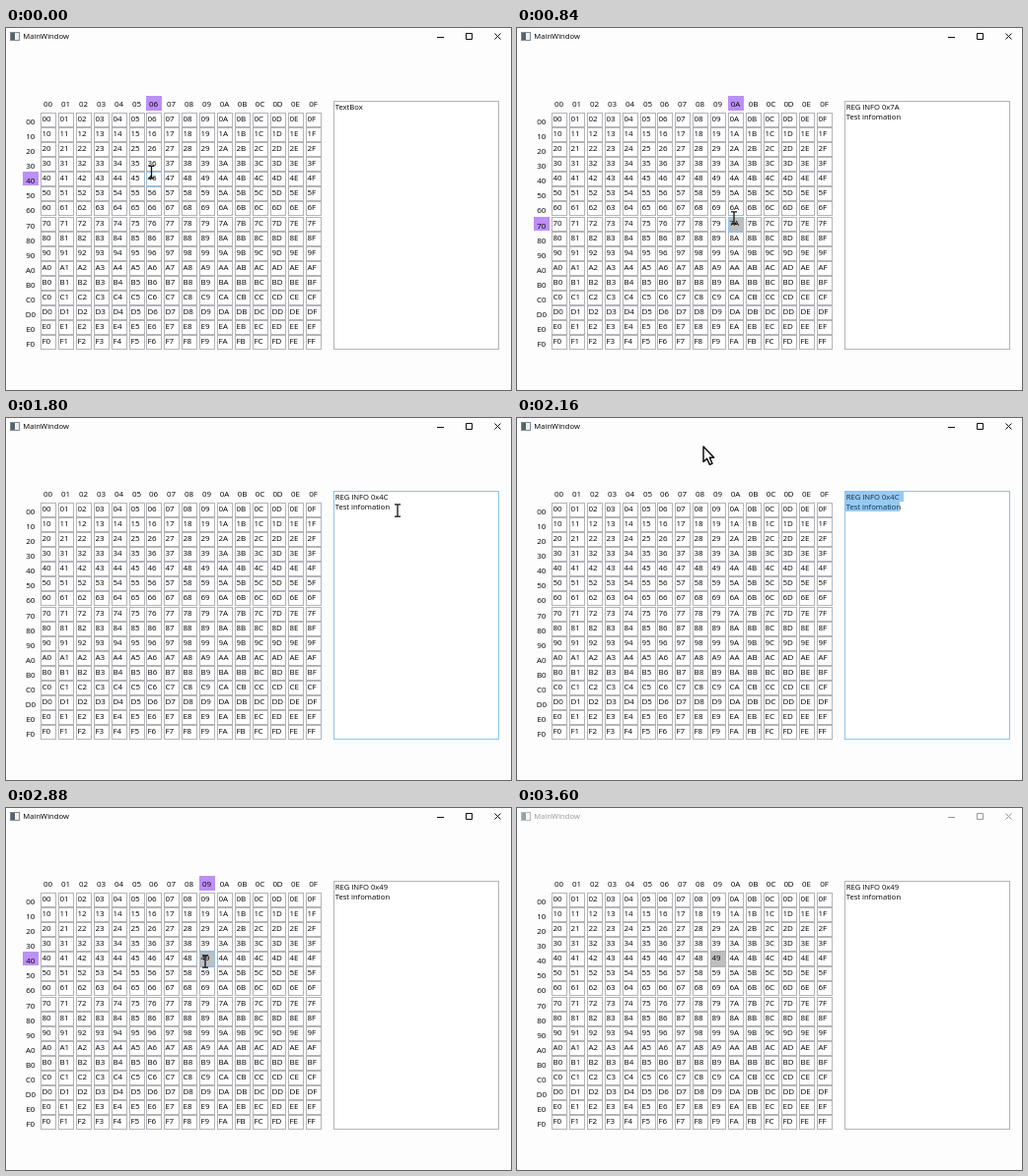
An HTML page for the animation above (3.72 s loop, 512x368 px).

```html
<!DOCTYPE html>
<html lang="en">
<head>
<meta charset="utf-8">
<title>Register map</title>
<style>
  html, body { margin: 0; width: 100%; height: 100%; overflow: hidden; background: #fdfdfd; }
  svg { display: block; width: 512px; height: 368px; }
  text { font: 8px "Open Sans", "Noto Sans", sans-serif; fill: #000; white-space: pre; }
  .ui { font-size: 7.65px; }
  .hex { letter-spacing: -.1px; }
  .mid { text-anchor: middle; }
  .box { fill: #fff; stroke: #b2b4b8; }
  .mark { fill: #bd8ff8; }
  .ctrl { fill: none; stroke: #111; }
  .off text { fill: #999; }
  .off .ctrl { stroke: #999; }
  .off .icon { opacity: .6; }
</style>
</head>
<body>
<svg id="stage" viewBox="0 0 512 368"></svg>
<script>
const LOOP = 3720;
const LEFT = 35, TOP = 86, DX = 17.91, DY = 15.08;
const HOVER = '#8fc3ee', BORDER = '#b2b4b8';

// Each step holds until the next: ms, pointer x, y, shown register, focus, selection (0-2)
const STEPS = [
  [0, 147.5, 146.5, '', ''],
  [120, 161, 157, '', ''],
  [240, 181, 170, '', ''],
  [360, 202, 183, '', ''],
  [480, 217, 192, '', ''],
  [600, 219, 194, '7A', '7A'],
  [840, 220, 193, '7A', '7A'],
  [960, 241, 170, '7A', '7A'],
  [1080, 258, 151, '4C', '4C'],
  [1440, 258, 149.5, '4C', '4C'],
  [1560, 310, 135, '4C', '4C'],
  [1680, 390, 108, '4C', '4C'],
  [1800, 397, 94, '4C', 'box'],
  [1920, 350, 85, '4C', 'box', 1],
  [2040, 258, 52, '4C', 'box', 2],
  [2160, 189, 29, '4C', 'box', 2],
  [2280, 187, 42, '4C', 'box', 2],
  [2400, 188, 82, '4C', 'box', 2],
  [2520, 190, 132, '4C', 'box', 2],
  [2640, 192, 165.5, '4C', 'box', 2],
  [2760, 199, 161, '4C', 'box', 2],
  [2880, 202, 156, '49', '49'],
  [3120, 202.5, 157, '49', '49'],
  [3240, 210, 130, '49', '49'],
  [3360, 224, 86, '49', '49'],
  [3480, 238, 30, '49', '49'],
  [3600, -40, -40, '49', '49']
];
const DRAG = [1800, 2040], INACTIVE = 3600;

const stage = document.getElementById('stage');
const hex = n => n.toString(16).toUpperCase();
const colX = c => Math.round(LEFT + c * DX);
const rowY = r => Math.round(TOP + r * DY);

function add(tag, attrs, parent = stage) {
  const el = document.createElementNS('http://www.w3.org/2000/svg', tag);
  for (const k in attrs) el.setAttribute(k, attrs[k]);
  return parent.appendChild(el);
}
const rect = (x, y, width, height, cls, parent) =>
  add('rect', { x, y, width, height, class: cls }, parent);
function label(x, y, s, cls = '', parent) {
  const el = add('text', { x, y, class: cls }, parent);
  el.textContent = s;
  return el;
}
const show = (el, on) => el.style.display = on ? '' : 'none';

// Title bar
const bar = add('g', {});
const icon = add('g', { class: 'icon' }, bar);
add('rect', { x: 4.5, y: 4.5, width: 9, height: 8, fill: '#eef1f3', stroke: '#848b91' }, icon);
add('rect', { x: 5, y: 5, width: 4, height: 7, fill: '#53636c' }, icon);
label(17.3, 11.4, 'MainWindow', 'ui', bar);
add('path', { class: 'ctrl', d: 'M437 9.5h7M466.5 5.5h6v6h-6zM495.5 5.5l6 6m0-6l-6 6' }, bar);

// Header marks and register grid
const colMark = rect(0, 69, 16, 15, 'mark');
const rowMark = rect(17, 0, 16, 14, 'mark');
const cells = {};
for (let i = 0; i < 16; i++) {
  label(colX(i) + 7.5, 80.4, '0' + hex(i), 'hex mid');
  label(24.8, rowY(i) + 11.5, hex(i) + '0', 'hex mid');
}
for (let r = 0; r < 16; r++) {
  for (let c = 0; c < 16; c++) {
    const x = colX(c), y = rowY(r), id = hex(r) + hex(c);
    cells[id] = rect(x + .5, y + .5, 15, 14, 'box');
    label(x + 1.6, y + 9.2, id, 'hex');
  }
}

// Text panel
const panel = rect(332.5, 74.5, 167, 252, 'box');
const lines = [label(333.7, 83.2, '', 'ui'), label(333.7, 93.3, '', 'ui')];
const picks = [75, 85].map(y =>
  add('rect', { x: 333, y, height: 10, fill: '#0078d7', 'fill-opacity': .4 }));

// Pointers
const beam = add('path', {
  d: 'M-3 -6.2h2.2l.8 .7 .8-.7h2.2M0 -5.5v11M-3 6.2h2.2l.8-.7 .8 .7h2.2',
  fill: 'none', stroke: '#111', 'stroke-width': 1.3
});
const arrow = add('path', {
  d: 'M0 0V15.5L3.6 12.2L6.4 18.4L9 17.2L6.3 11.2H10.7Z',
  fill: '#fff', stroke: '#111', 'stroke-width': 1.5, 'stroke-linejoin': 'round'
});

function paint(step) {
  const [ms, x, y, reg, focus, sel = 0] = step;
  const col = Math.floor((x - LEFT) / DX), row = Math.floor((y - TOP) / DY);
  const inGrid = col >= 0 && col < 16 && row >= 0 && row < 16;
  const inPanel = x > 332 && x < 500 && y > 74 && y < 327;
  const dragging = ms >= DRAG[0] && ms <= DRAG[1];
  const hover = inGrid ? hex(row) + hex(col) : '';

  for (const id in cells) {
    cells[id].style.fill = id === focus ? '#bfbfbf' : '#fff';
    cells[id].style.stroke = id === hover ? HOVER : BORDER;
  }
  show(colMark, inGrid);
  show(rowMark, inGrid);
  if (inGrid) {
    colMark.setAttribute('x', colX(col));
    rowMark.setAttribute('y', rowY(row));
  }

  panel.style.stroke = focus === 'box' || inPanel ? HOVER : BORDER;
  lines[0].textContent = reg ? 'REG INFO 0x' + reg : 'TextBox';
  lines[1].textContent = reg ? 'Test infomation' : '';
  const widths = [[0, 0], [0, 55], [59, 55]][sel];
  const starts = [333, sel === 1 ? 350 : 333];
  picks.forEach((p, i) => {
    p.setAttribute('x', starts[i]);
    p.setAttribute('width', Math.max(0, widths[i] - (starts[i] - 333)));
  });

  const isBeam = inGrid || inPanel || dragging;
  show(beam, isBeam);
  show(arrow, !isBeam);
  (isBeam ? beam : arrow).setAttribute('transform', `translate(${x} ${y})`);
  bar.setAttribute('class', ms >= INACTIVE ? 'off' : '');
}

const start = performance.now();
let current;
function tick() {
  const t = (performance.now() - start) % LOOP;
  const step = STEPS.filter(s => s[0] <= t).pop();
  if (step !== current) paint(current = step);
  requestAnimationFrame(tick);
}
tick();
</script>
</body>
</html>
```
